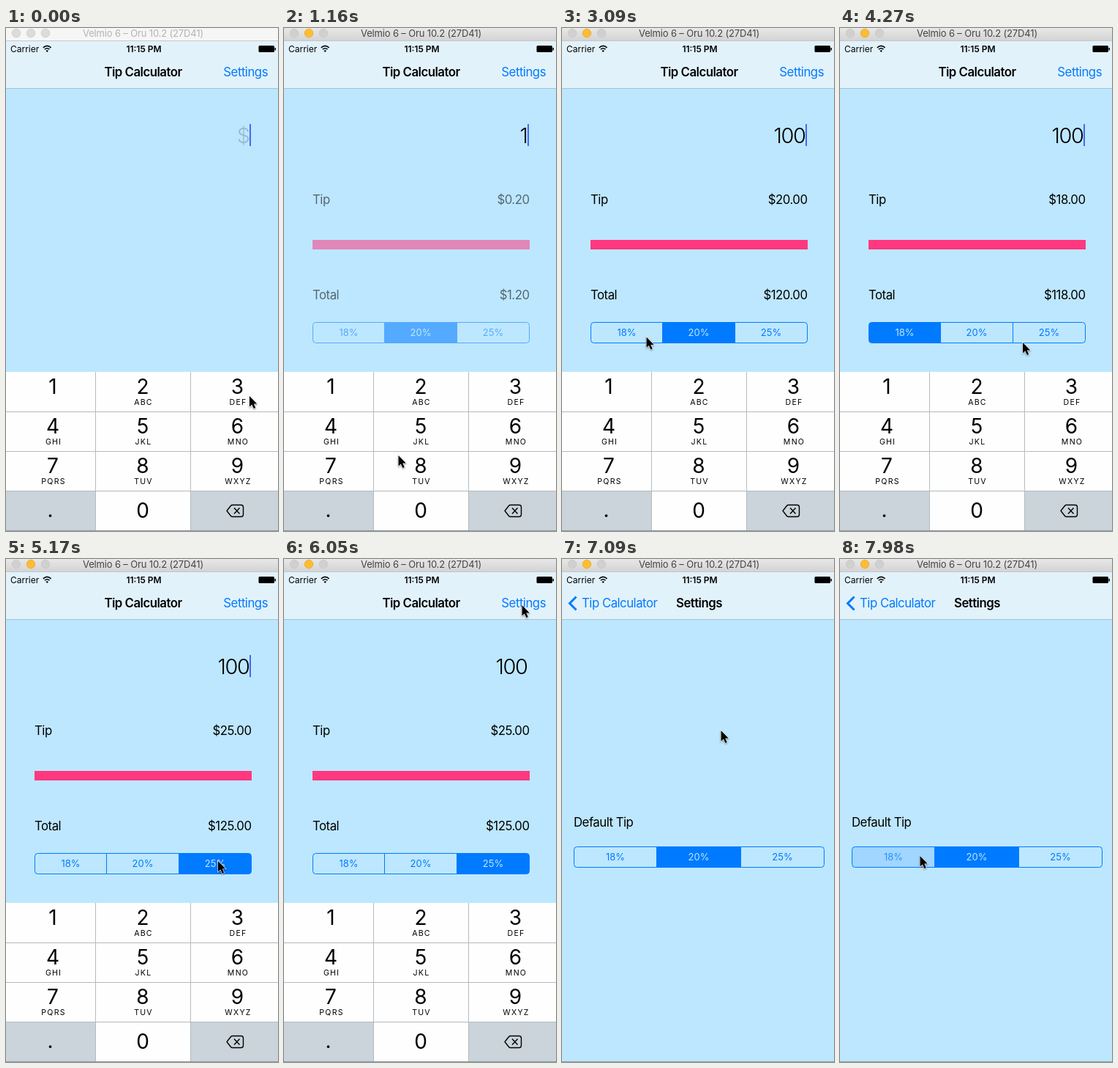
Animation of 372 by 686 pixels, one loop 8 s. Source, as an HTML page:

```html
<!DOCTYPE html>
<html lang="en">
<head>
<meta charset="utf-8">
<title>Tip Calculator</title>
<style>
html, body { margin: 0; width: 372px; height: 686px; overflow: hidden; }
svg { display: block; }
text { font: 16.8px Inter, "Open Sans", sans-serif; letter-spacing: -.03em; }
.mid { text-anchor: middle; }
.end { text-anchor: end; }
.bold { font-weight: 600; }
.blue { fill: #007aff; }
.window { font-size: 13px; letter-spacing: -.012em; }
.status { font-size: 12px; letter-spacing: 0; }
.amount { font-size: 29px; font-weight: 300; letter-spacing: -.05em; }
.digit { font-size: 28px; letter-spacing: 0; }
.letters { font-size: 10.6px; letter-spacing: 1.2px; }
.percent { font-size: 13px; letter-spacing: 0; }
</style>
</head>
<body>
<svg id="stage" width="372" height="686"></svg>
<script>
const BG = '#bde7ff', BLUE = '#007aff', KEY_GRAY = '#cad4da';
const LOOP = 8000, TICK = 148, PUSH = 44;
const RATES = [18, 20, 25];

const text = (x, y, str, cls = '', extra = '') =>
  `<text x="${x}" y="${y}" class="${cls}" ${extra}>${str}</text>`;
const rect = (x, y, w, h, fill, extra = '') =>
  `<rect x="${x}" y="${y}" width="${w}" height="${h}" fill="${fill}" ${extra}/>`;

// Segmented control: one outlined cell per rate, outer corners rounded
function segments(name, edges, y) {
  return RATES.map((rate, i) => {
    const a = edges[i], b = edges[i + 1], l = i == 0 ? 4 : 0, r = i == 2 ? 4 : 0;
    const d = `M${a + l} ${y}H${b - r}q${r} 0 ${r} ${r}V${y + 28 - r}q0 ${r} ${-r} ${r}` +
      `H${a + l}q${-l} 0 ${-l} ${-l}V${y + l}q0 ${-l} ${l} ${-l}z`;
    return `<path id="${name}${i}" d="${d}" stroke="${BLUE}"/>` +
      text((a + b) / 2, y + 18.7, rate + '%', 'mid percent', `id="${name}Text${i}"`);
  }).join('');
}

function keypad() {
  const letters = ['', 'ABC', 'DEF', 'GHI', 'JKL', 'MNO', 'PQRS', 'TUV', 'WXYZ'];
  const centers = [64, 187, 316.5];
  let out = rect(0, 469, 372, 217, '#fefefe') +
    rect(0, 631, 122, 55, KEY_GRAY) + rect(253, 631, 119, 55, KEY_GRAY) +
    rect(0, 469, 122, 54, KEY_GRAY, 'id="key1"') + rect(123, 631, 129, 55, KEY_GRAY, 'id="key0"');
  letters.forEach((str, i) => {
    const x = centers[i % 3], y = 469 + 54 * Math.floor(i / 3);
    out += text(x, y + 30, i + 1, 'mid digit') + text(x + 1, y + 45, str, 'mid letters');
  });
  return out + text(187, 668, 0, 'mid digit') + text(60.5, 667, '.', 'mid digit') +
    '<path d="M0 523.5H372M0 577.5H372M0 631.5H372M122.5 469V686M252.5 469V686" stroke="#b4babe"/>' +
    `<path d="M309.5 650.5H321.5q3 0 3 3V663.5q0 3 -3 3H309.5q-1 0 -2 -1L302 658.5L307.500 651.500
      q1 -1 2 -1zM312 654.500l7.500 8m0 -8l-7.500 8" fill="none" stroke="#000" stroke-width="1.4"
      stroke-linejoin="round"/>`;
}

const light = i => `<circle id="light${i}" cx="${14 + 20 * i}" cy="7" r="5.8" stroke-width=".6"/>`;

stage.innerHTML = `
<defs>
  <linearGradient id="bar" x2="0" y2="1"><stop stop-color="#e8e8e8"/><stop offset="1" stop-color="#d2d2d2"/></linearGradient>
  <linearGradient id="shade"><stop stop-opacity="0"/><stop offset="1" stop-opacity=".32"/></linearGradient>
</defs>
<g id="home">
  ${rect(0, 18, 372, 668, BG)}
  ${text(332.5, 157, '$', 'end amount', 'id="amount"')}
  ${rect(333, 131, 2, 30, '#426bf2', 'id="caret"')}
  <g id="result">
    ${text(39, 239.5, 'Tip')}${text(335.5, 239.5, '', 'end', 'id="tip"')}
    ${rect(39, 289, 297, 13, '#ff387f')}
    ${text(39, 369.5, 'Total')}${text(335.5, 369.5, '', 'end', 'id="total"')}
    ${segments('rate', [39.5, 137.5, 236.5, 335.5], 401.5)}
  </g>
  ${rect(0, 18, 372, 451, '#000', 'id="dim"')}
  ${keypad()}
</g>
<g id="settings">
  ${rect(-9, 18, 9, 668, 'url(#shade)')}
  ${rect(0, 18, 372, 668, BG)}
  ${text(16, 364.5, 'Default Tip')}
  ${segments('preset', [16.5, 129.5, 244.5, 358.5], 392.5)}
</g>
${rect(0, 18, 372, 64, '#f9f9f9', 'opacity=".62"')}
${rect(0, 82, 372, 1, '#a5c2cf')}
${rect(0, 685, 372, 1, '#8d999f')}
${text(6, 32.500, 'Carrier', 'status')}
${text(188.5, 32.5, '11:15 PM', 'mid bold status')}
<path d="M50.800 26.800q5.400 -4.800 10.800 0M52.900 29.200q3.300 -2.900 6.600 0" fill="none" stroke="#000" stroke-width="1.6"/>
<path d="M54.400 31q1.800 -1.500 3.600 0l-1.800 2z"/>
${rect(345.5, 24, 21.5, 9, '#000', 'rx="1.5"')}${rect(367.5, 27, 1.500, 3.500, '#000')}
<g id="homeNav">
  ${text(187.5, 66, 'Tip Calculator', 'mid bold')}
  ${text(358, 66, 'Settings', 'end blue', 'id="link"')}
</g>
<g id="settingsNav">
  <path id="chevron" d="M19.500 51.500L10.500 60.500L19.500 69.500" fill="none" stroke="${BLUE}" stroke-width="3"/>
  ${text(27, 66, 'Tip Calculator', 'blue', 'id="back"')}
  ${text(187.5, 66, 'Settings', 'mid bold', 'id="heading"')}
</g>
${rect(0, 0, 372, 18, '', 'id="chrome"')}${rect(0, 17, 372, 1, '#c8c8c8')}
${[0, 1, 2].map(light).join('')}
${text(187.5, 11.8, 'Velmio 6 – Oru 10.2 (27D41)', 'mid window', 'id="caption"')}
<path id="pointer" d="M0 0V14.500L3.300 11.400L5.900 17L8.300 16L5.800 10.400H10.300z" stroke="#fff" stroke-width="1.2"
  paint-order="stroke" style="filter:drop-shadow(0 1px 1px #0006)"/>`;

const $ = id => document.getElementById(id);
const set = (id, attrs) => { for (const a in attrs) $(id).setAttribute(a, attrs[a]); };
const show = (id, on) => set(id, { opacity: +on });
const move = (id, x, y = 0) => set(id, { transform: `translate(${x} ${y})` });

// Pointer stops: tick, x, y
const STOPS = [
  [0, 333, 502], [2, 166, 521], [3, 166, 521], [6, 72, 492], [7, 88, 508], [8, 156.500, 583],
  [11, 190, 646], [16, 190, 646], [21, 115.500, 421.500], [22, 102, 411], [26, 102, 411],
  [29, 250, 429], [32, 290, 412], [36, 290, 412], [40, 325.500, 63], [45, 325.500, 63],
  [51, 109.500, 405], [60, 109.500, 405]
];

function pointerAt(k) {
  const i = STOPS.findIndex(s => s[0] > k);
  const [k0, x0, y0] = STOPS[i - 1], [k1, x1, y1] = STOPS[i];
  const p = (k - k0) / (k1 - k0), e = p * p * (3 - 2 * p);
  return [x0 + (x1 - x0) * e, y0 + (y1 - y0) * e];
}

function paintSegments(name, chosen, pressed) {
  RATES.forEach((_, i) => {
    set(name + i, { fill: i == chosen ? BLUE : i == pressed ? '#a0d6ff' : 'none' });
    set(name + 'Text' + i, { fill: i == chosen ? BG : BLUE, opacity: i == pressed ? .75 : 1 });
  });
}

function draw(t) {
  // The screen refreshes in even ticks and holds between them
  const k = Math.floor((t + 25) / TICK);
  const active = k >= 6;
  set('chrome', { fill: active ? 'url(#bar)' : '#f6f6f6' });
  set('caption', { fill: active ? '#444' : '#b3b3b3' });
  for (let i = 0; i < 3; i++) {
    const lit = active && i == 1;
    set('light' + i, { fill: lit ? '#fdbd2e' : active ? '#d0d0d0' : '#dcdcdc', stroke: lit ? '#dfa023' : '#c2c2c2' });
  }

  const bill = k < 7 ? 0 : k < 12 ? 1 : k < 14 ? 10 : 100;
  const chosen = k < 25 ? 1 : k < 34 ? 0 : 2;
  const tip = bill * RATES[chosen] / 100;
  $('amount').textContent = bill || '$';
  set('amount', { fill: bill ? '#000' : '#97b9cc' });
  $('tip').textContent = '$' + tip.toFixed(2);
  $('total').textContent = '$' + (bill + tip).toFixed(2);
  show('result', bill ? Math.min(1, .25 + .3 * (k - 7)) : 0);
  paintSegments('rate', chosen, k == 24 ? 0 : k == 33 ? 2 : -1);
  show('key1', k == 6);
  show('key0', k == 11 || k == 13);
  show('link', k == 40 ? .3 : 1);

  const blink = (t - 3080) % 1040 < 590;
  show('caret', t < 140 || t >= 570 && (t < 2600 || blink));

  // Push transition, caught near the end of its slide
  const pushed = k >= PUSH;
  const off = k > PUSH + 2 ? 0 : pushed ? 22 * .2 ** (k - PUSH) : 372;
  const done = 1 - off / 372;
  move('home', -.3 * (372 - off));
  move('settings', off + (pushed ? 0 : 20));
  show('dim', .1 * done);
  show('homeNav', !pushed);
  show('settingsNav', pushed);
  show('chevron', off > 10 ? .4 : 1);
  move('back', off * .27);
  move('heading', off * .55);
  paintSegments('preset', 1, t >= 7975 ? 0 : -1);

  move('pointer', ...pointerAt(k));
}

let start;
function loop(now) {
  start ??= now;
  draw((now - start) % LOOP);
  requestAnimationFrame(loop);
}
draw(0);
requestAnimationFrame(loop);
</script>
</body>
</html>
```
